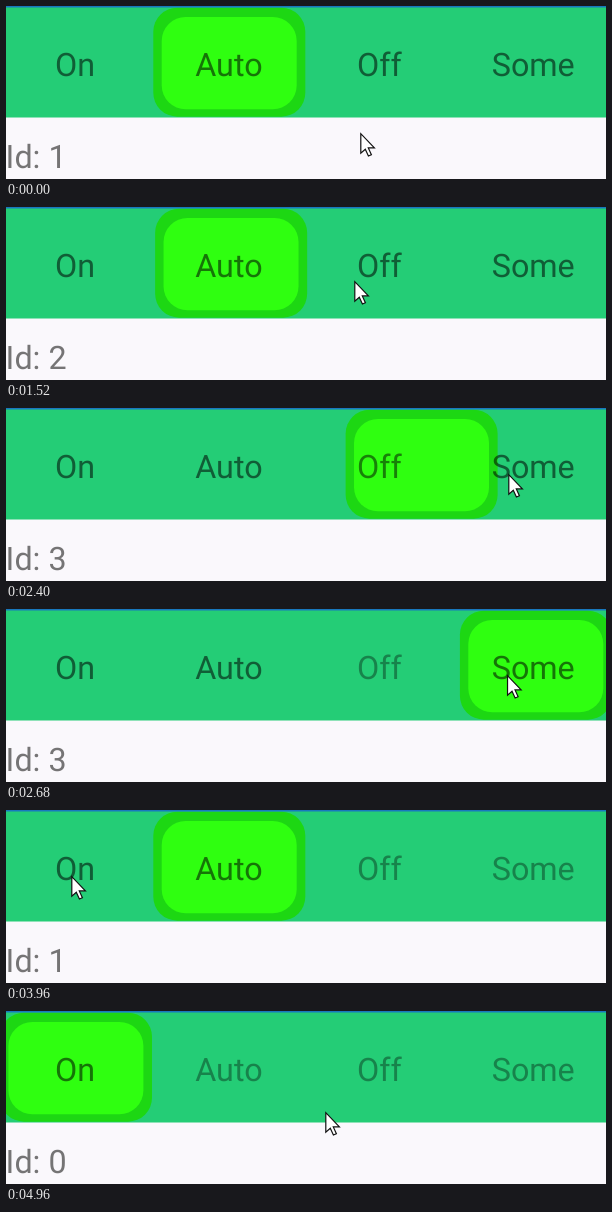
Animation, 600 px wide and 173 px high, one loop 5000 ms. Source, as an HTML page with a canvas:

```html
<!DOCTYPE html>
<html lang="en">
<head>
<meta charset="utf-8">
<title>Segmented switch</title>
<style>
html, body { margin: 0; width: 100%; height: 100%; overflow: hidden; background: #faf8fc; }
canvas { display: block; width: 600px; height: 173px; }
</style>
</head>
<body>
<canvas id="stage" width="600" height="173"></canvas>
<script>
const ctx = document.getElementById('stage').getContext('2d');
const LOOP = 5000, STEP = 153.3, SLIDE = 300;
const TRAVEL = 0.35; // share of each gap between stops spent moving
const DARK = 0.54, LIGHT = 0.36;

const labels = [
  { name: 'On', x: 49 }, { name: 'Auto', x: 189.2 },
  { name: 'Off', x: 351 }, { name: 'Some', x: 485.7 }
];

// The pointer reaches each stop at its time and picks that segment
const stops = [
  { at: 0, x: 355, y: 127, pick: 1 },
  { at: 1500, x: 349, y: 74, pick: 2 },
  { at: 2300, x: 503, y: 66, pick: 3 },
  { at: 2870, x: 317, y: 66, pick: 2 },
  { at: 3420, x: 205, y: 66, pick: 1 },
  { at: 3950, x: 66, y: 66, pick: 1 },
  { at: 4180, x: 66, y: 66, pick: 0 },
  { at: 4950, x: 320, y: 101, pick: 0 }
];

const mix = (a, b, p) => a + (b - a) * p;
const ease = p => (1 - Math.cos(Math.PI * Math.max(0, Math.min(1, p)))) / 2;

function pointerAt(t) {
  const i = stops.findIndex(stop => stop.at > t);
  if (i < 0) return stops[stops.length - 1];
  const from = stops[i - 1], to = stops[i];
  const duration = (to.at - from.at) * TRAVEL;
  const p = ease(1 - (to.at - t) / duration);
  return { x: mix(from.x, to.x, p), y: mix(from.y, to.y, p) };
}

function switchAt(t) {
  const alphas = labels.map(() => DARK);
  const picked = new Set();
  let selected = stops[0].pick, position = selected;
  for (const { at, pick } of stops) {
    if (at > t) break;
    if (pick === selected) continue;
    const p = ease((t - at) / SLIDE);
    position = mix(selected, pick, p);
    // Only labels chosen with the pointer fade when left
    if (picked.has(selected)) alphas[selected] = mix(DARK, LIGHT, p);
    alphas[pick] = mix(alphas[pick], DARK, p);
    picked.add(pick);
    selected = pick;
  }
  return { position, selected, alphas };
}

function rect(color, x, y, w, h, r = 0) {
  ctx.fillStyle = color;
  ctx.beginPath();
  ctx.roundRect(x, y, w, h, r);
  ctx.fill();
}

function text(str, x, y, color) {
  ctx.fillStyle = color;
  ctx.fillText(str, x, y);
}

function drawPointer({ x, y }) {
  ctx.save();
  ctx.translate(x - 0.2, y + 0.7);
  ctx.fillStyle = '#fff';
  ctx.strokeStyle = '#111';
  ctx.lineWidth = 1.2;
  const arrow = new Path2D('M0 0V19.5L4.5 15.6L7.6 22.3L10.6 21L7.5 14.2H13.6Z');
  ctx.fill(arrow);
  ctx.stroke(arrow);
  ctx.restore();
}

function draw(t) {
  const { position, selected, alphas } = switchAt(t);
  const left = position * STEP;
  rect('#faf8fc', 0, 0, 600, 173);
  rect('#24cd76', 0, 0, 600, 111.4);
  rect('#1dd713', left - 6, 1.7, 152, 109, 24);
  rect('#2fff10', left + 2.4, 11, 135, 92.3, 24);
  rect('#1878be', 0, 0, 600, 1.5);

  ctx.font = '32.3px Roboto, sans-serif';
  ctx.textRendering = 'geometricPrecision';
  labels.forEach(({ name, x }, i) => text(name, x, 70, `rgba(0,0,0,${alphas[i]})`));
  text('Id: ' + selected, -0.4, 162, '#757475');
  drawPointer(pointerAt(t));
}

function frame(now) {
  draw(now % LOOP);
  requestAnimationFrame(frame);
}
requestAnimationFrame(frame);
</script>
</body>
</html>
```
